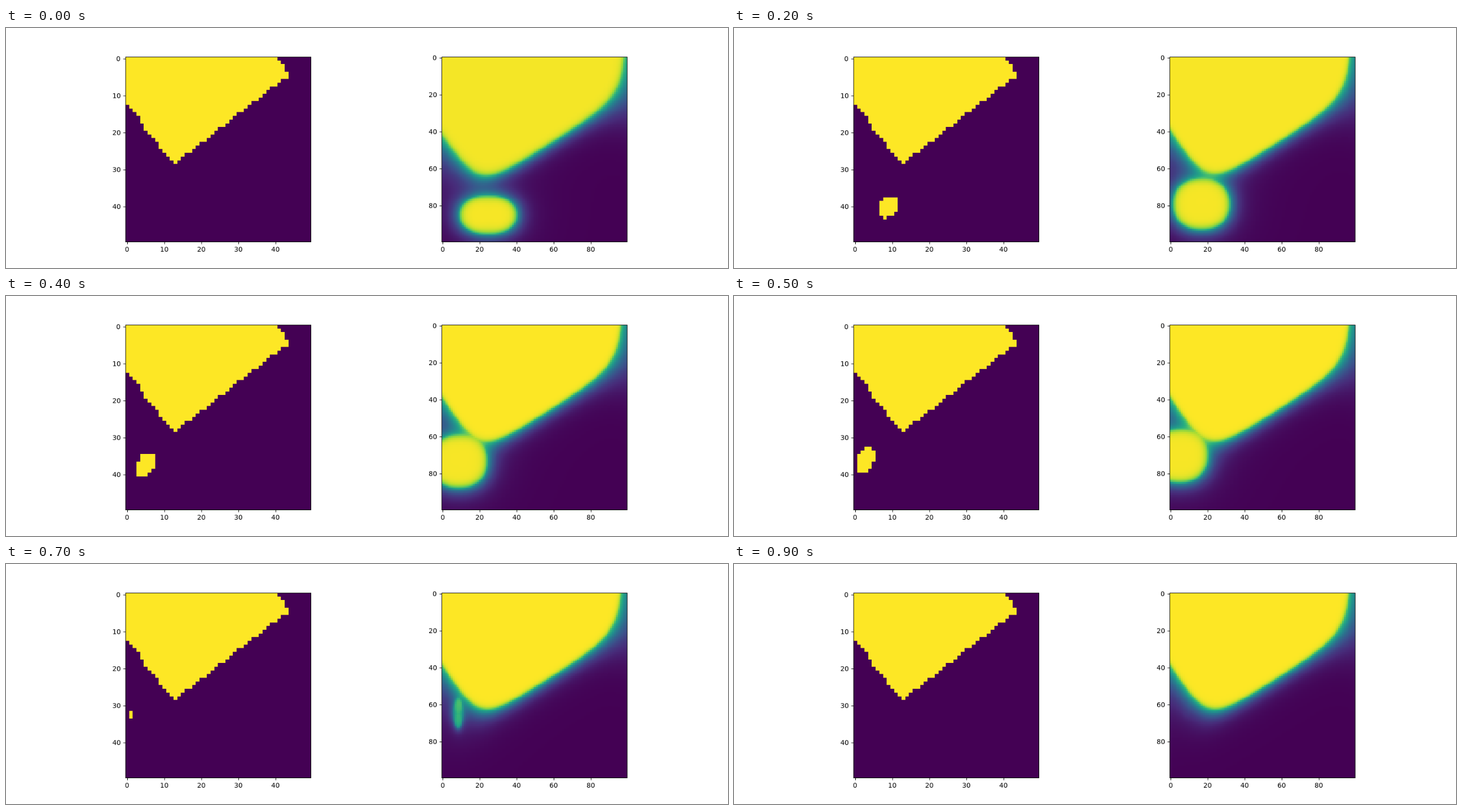
Write an HTML page with a canvas that moves like this. It is 1280x427 px and loops after 1 s.

```html
<!DOCTYPE html>
<html>
<head>
<meta charset="utf-8">
<style>
  html, body { margin: 0; width: 100%; height: 100%; overflow: hidden; background: #fff; }
  canvas { display: block; width: 1280px; height: 427px; }
</style>
</head>
<body>
<canvas id="figure" width="1500" height="500"></canvas>
<script>
const ctx = document.getElementById('figure').getContext('2d');
const { exp, hypot, round, floor, min, max, sin, cos, log } = Math;
const SIZE = 385, TOP = 60;

// Colour map, linear between evenly spaced stops
const stops = '440154 472c7a 3b518b 2c718e 21908d 27ad81 5cc863 aadc32 fde725'
  .split(' ').map(h => [0, 2, 4].map(i => parseInt(h.slice(i, i + 2), 16)));
function colour(v) {
  const p = max(0, min(1, v)) * 8, i = min(7, floor(p));
  return stops[i].map((c, k) => c + (stops[i + 1][k] - c) * (p - i));
}

// Left panel: a fixed wedge and a small tilted ellipse drifting to the upper left
function inWedge(x, y) {
  const start = max(min(y - 12, 4), round(9 / 11 * (y - 28) + 12.75));
  const end = y < 6 ? min(44, round(41 + .75 * y)) : round(42 - 1.28 * (y - 6));
  return y < 29 && x >= start && x < end;
}

function inSpot(x, y, step) {
  const dx = x + .5 - (13.5 - 2.05 * step), dy = y + .5 - (43.3 - 1.35 * step);
  const tilt = .7 + .08 * step;
  const along = dx * cos(tilt) - dy * sin(tilt), across = dx * sin(tilt) + dy * cos(tilt);
  return step > 0 && x > 0 && hypot(along / 3.5, across / 2.25) < 1;
}

const mask = step => (x, y) => inWedge(x, y) || inSpot(x, y, step) ? 1 : 0;

// Right panel: a smooth version of both shapes
function wedgeValue(x, y, step) {
  const planes = [-.836 * x + .549 * y - 21.6, .536 * x + .845 * y - 70.3, x - 97.8];
  const border = ((x - 50) / 50) ** 4;
  const d = 8 * log(planes.reduce((sum, p) => sum + exp(p / 8), 0))
    - .8 * exp(-step / 2) - 1.2 * border * exp(-2 * step);
  return d < 0 ? min(1, .987 + .003 * step) - .28 * exp(d / (.8 + .3 * exp(-step)))
               : .65 * exp(-d / (2.7 + 3.5 * border)) + .07 * exp(-d / 7);
}

// The blob follows the ellipse, then collapses to a fading sliver
function blobAt(step) {
  const cy = 85.5 - 2.9 * step;
  return step < 7
    ? { cx: 25.2 - 4 * step, cy, rx: 16, ry: 15 - 4 * exp(-step), peak: .99, soft: 1.5, halo: 3.2 }
    : { cx: 9, cy, rx: 2.8, ry: 8.3, peak: .62 * .2 ** (step - 7), soft: 1, halo: 1.6 };
}

function blobValue(x, y, { cx, cy, rx, ry, peak, soft, halo }) {
  const dx = x - cx, dy = y - cy, n = 2.2;
  const s = (Math.abs(dx / rx) ** n + Math.abs(dy / ry) ** n) ** (1 / n) + 1e-6;
  const d = (s - 1) / s * hypot(dx, dy);
  return peak * (d < 0 ? 1 - .5 * exp(d / soft) : .43 * exp(-d / halo) + .07 * exp(-d / 10));
}

function field(step) {
  const blob = blobAt(step);
  return (col, row) => {
    const x = col + .5, y = row + .5;
    return 1 - (1 - wedgeValue(x, y, step)) * (1 - blobValue(x, y, blob));
  };
}

function drawPanel(left, cells, tickStep, value) {
  const tile = document.createElement('canvas');
  tile.width = tile.height = cells;
  const tctx = tile.getContext('2d'), image = tctx.createImageData(cells, cells);
  for (let i = 0; i < cells * cells; i++)
    image.data.set([...colour(value(i % cells, floor(i / cells))), 255], i * 4);
  tctx.putImageData(image, 0, 0);

  // The small offset settles cell edges that fall on pixel centres
  ctx.imageSmoothingEnabled = false;
  ctx.drawImage(tile, left - .02, TOP - .02, SIZE, SIZE);
  ctx.lineWidth = 1.11;
  ctx.strokeRect(left + .5, TOP + .5, SIZE, SIZE);

  for (let n = 0; n < cells; n += tickStep) {
    const offset = (n + .5) * SIZE / cells, width = ctx.measureText(n).width;
    const x = round(left + offset) + .5, y = round(TOP + offset) + .5;
    ctx.beginPath();
    ctx.moveTo(x, TOP + SIZE + .5);
    ctx.lineTo(x, TOP + SIZE + 5.4);
    ctx.moveTo(left + .5, y);
    ctx.lineTo(left - 4.4, y);
    ctx.stroke();
    ctx.fillText(n, round(left + offset - width / 2), TOP + SIZE + 21);
    ctx.fillText(n, round(left - 9.7 - width), round(TOP + offset + 5.2));
  }
}

function draw(step) {
  ctx.fillStyle = '#fff';
  ctx.fillRect(0, 0, 1500, 500);
  ctx.fillStyle = ctx.strokeStyle = '#000';
  ctx.font = '13.89px "DejaVu Sans", sans-serif';
  drawPanel(248, 50, 10, mask(step));
  drawPanel(905, 100, 20, field(step));
}

let shown = -1;
function tick() {
  const step = floor(performance.now() % 1000 / 100);
  if (step !== shown) draw(shown = step);
  requestAnimationFrame(tick);
}
tick();
</script>
</body>
</html>
```
